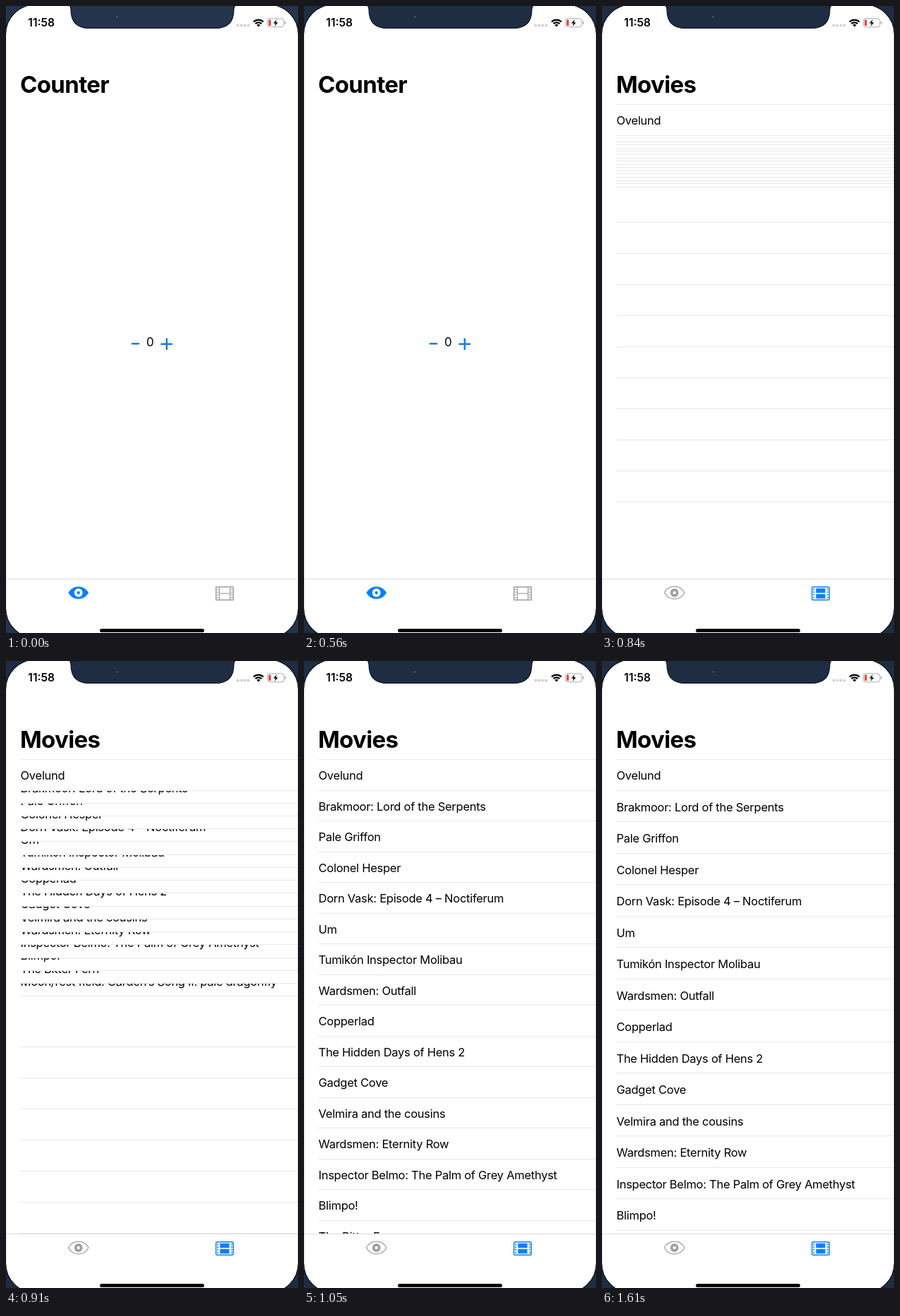
Write an HTML page with a canvas that moves like this. It is 414 by 888 pixels and loops after 2.03 s.

```html
<!DOCTYPE html>
<html lang="en">
<head>
<meta charset="utf-8">
<title>Counter and movies</title>
<style>
  html, body { margin: 0; width: 100%; height: 100%; overflow: hidden; background: #fff; }
  canvas { display: block; width: 414px; height: 888px; }
</style>
</head>
<body>
<canvas id="stage" width="414" height="888"></canvas>
<script>
const ctx = document.getElementById('stage').getContext('2d');
const W = 414, H = 888, LOOP = 2030, STEP = 70;
const SWITCH = 770, GROW = 313;
const BLUE = '#0a80f5', GREY = '#a0a0a0', LINE = '#e8e8e8', RIM = '#10161f';
const LIST_TOP = 139, ROWS_TOP = 183, ROW = 44.5, TAB_TOP = 811;

const titles = [
  'Brakmoor: Lord of the Serpents',
  'Pale Griffon',
  'Colonel Hesper',
  'Dorn Vask: Episode 4 – Noctiferum',
  'Um',
  'Tumikón Inspector Molibau',
  'Wardsmen: Outfall',
  'Copperlad',
  'The Hidden Days of Hens 2',
  'Gadget Cove',
  'Velmira and the cousins',
  'Wardsmen: Eternity Row',
  'Inspector Belmo: The Palm of Grey Amethyst',
  'Blimpo!',
  'The Bitter Fern',
  'Moon/rest field: Garden’s Song II. pale dragonfly'
];

function rect(x, y, w, h, color) {
  ctx.fillStyle = color;
  ctx.fillRect(x, y, w, h);
}

function pill(x, y, w, h, r, color, stroked) {
  ctx.beginPath();
  ctx.roundRect(x, y, w, h, r);
  paint(color, stroked);
}

function disc(x, y, r, color) {
  ctx.beginPath();
  ctx.arc(x, y, r, 0, Math.PI * 2);
  paint(color);
}

function paint(color, stroked) {
  if (stroked) {
    ctx.strokeStyle = color;
    ctx.stroke();
  } else {
    ctx.fillStyle = color;
    ctx.fill();
  }
}

function text(str, x, y, size, weight = 400, spacing = 0) {
  ctx.font = `${weight} ${size}px Inter, Roboto, sans-serif`;
  ctx.letterSpacing = spacing + 'px';
  ctx.fillStyle = '#000';
  ctx.fillText(str, x, y);
}

const heading = str => text(str, 20, 123, 33, 700, -0.65);
const label = (str, y) => text(str, 20.5, y, 16.5, 400, -0.27);
const separator = (y, color = LINE) => rect(20, Math.floor(y), W - 20, 1, color);

// cubic-bezier(.42, 0, .58, 1)
function easeInOut(x) {
  if (x <= 0) return 0;
  if (x >= 1) return 1;
  let lo = 0, hi = 1;
  for (let i = 0; i < 24; i++) {
    const s = (lo + hi) / 2, q = 1 - s;
    const bx = 3 * q * q * s * 0.42 + 3 * q * s * s * 0.58 + s ** 3;
    if (bx < x) lo = s; else hi = s;
  }
  return lo * lo * (3 - 2 * lo);
}

function drawCounter() {
  const color = '#1a7cd8';
  heading('Counter');
  rect(178, 477, 11, 2.5, color);
  text('0', 199, 482, 17);
  rect(219.5, 477.5, 16.5, 2.5, color);
  rect(226.6, 470.5, 2.5, 16.5, color);
}

function drawMovies(p) {
  heading('Movies');
  separator(LIST_TOP);
  label('Ovelund', 168);
  separator(ROWS_TOP, p ? LINE : '#d4d4d4');

  if (p < 1) {
    for (let i = 0; i < 10; i++) separator(226 + i * 44 + p * 783);
  }
  if (!p) return;

  // Each label hangs from the bottom edge of its growing row.
  const h = ROW * p;
  titles.forEach((title, i) => {
    const top = ROWS_TOP + i * h, bottom = top + h;
    ctx.save();
    ctx.beginPath();
    ctx.rect(0, Math.floor(top) + 1, W, h);
    ctx.clip();
    label(title, bottom - 15);
    ctx.restore();
    separator(bottom);
  });
}

function drawEye(active) {
  const x = 102.7, y = 831;
  ctx.beginPath();
  ctx.moveTo(x - 14.3, y);
  ctx.bezierCurveTo(x - 8, y - 11.8, x + 8, y - 11.8, x + 14.3, y);
  ctx.bezierCurveTo(x + 8, y + 11.8, x - 8, y + 11.8, x - 14.3, y);
  ctx.closePath();
  ctx.lineWidth = 1.3;
  paint(active ? BLUE : GREY, !active);
  disc(x, y, 5.9, active ? '#fff' : GREY);
  disc(x, y, 2.2, active ? BLUE : '#fff');
}

function drawFilm(active) {
  const color = active ? BLUE : GREY;
  ctx.lineWidth = 1.4;
  pill(297.7, 822.7, 24.6, 18.6, active ? 2 : 0.5, color, true);
  if (active) {
    for (const y of [824.8, 832.8]) rect(303.4, y, 13.2, 6.4, color);
  } else {
    for (const x of [302, 317]) rect(x, 823, 1.1, 18, color);
    rect(303, 831.4, 14, 1.2, color);
  }
  for (const x of [298, 318]) {
    for (let i = 0; i < 4; i++) {
      if (active) rect(x + 1.4, 825.2 + i * 3.9, 1.8, 1.8, color);
      else rect(x, 825.7 + i * 3.9, 4, 1, color);
    }
  }
}

function drawTabs(movies) {
  rect(0, TAB_TOP, W, H - TAB_TOP, '#fff');
  rect(0, TAB_TOP, W, 1, '#dcdcdc');
  drawEye(!movies);
  drawFilm(movies);
  pill(133, 882, 148, 5, 2.5, '#000');
}

function drawStatus() {
  text('11:58', 31.3, 29.3, 15.6, 600);
  for (let i = 0; i < 4; i++) disc(328.5 + i * 5, 27.6, 2, '#d2d2d6');

  // Wi-Fi
  const cx = 358, cy = 29.5, a = Math.PI / 4;
  ctx.lineWidth = 2.2;
  for (const r of [6.2, 9.8]) {
    ctx.beginPath();
    ctx.arc(cx, cy, r, -Math.PI / 2 - a, -Math.PI / 2 + a);
    paint('#000', true);
  }
  ctx.beginPath();
  ctx.moveTo(cx, cy);
  ctx.arc(cx, cy, 3.6, -Math.PI / 2 - a, -Math.PI / 2 + a);
  paint('#000');

  // Battery
  ctx.lineWidth = 1;
  pill(370.5, 17.8, 23.5, 12, 3.4, '#ababab', true);
  pill(395.2, 21.8, 1.5, 4, 0.8, '#ababab');
  pill(372.3, 19.6, 3.2, 8.4, 1, '#e8402f');
  ctx.beginPath();
  ctx.moveTo(383.8, 19);
  ctx.lineTo(379, 24.6);
  ctx.lineTo(382, 24.6);
  ctx.lineTo(380.8, 28.8);
  ctx.lineTo(385.6, 23.2);
  ctx.lineTo(382.6, 23.2);
  ctx.closePath();
  paint('#000');
}

function drawBezel(color) {
  ctx.lineWidth = 1.2;
  ctx.beginPath();
  ctx.rect(0, 0, W, H);
  ctx.roundRect(0, -1.5, W, 896, 41.5);
  ctx.fillStyle = color;
  ctx.fill('evenodd');
  pill(-0.5, -2, W + 1, 897, 42, RIM, true);

  ctx.beginPath();
  ctx.moveTo(89, -1);
  ctx.quadraticCurveTo(92, 0, 92, 5);
  ctx.bezierCurveTo(92, 22, 100, 31.5, 118, 31.5);
  ctx.lineTo(297, 31.5);
  ctx.bezierCurveTo(315, 31.5, 323, 22, 323, 5);
  ctx.quadraticCurveTo(323, 0, 326, -1);
  paint(color);
  paint(RIM, true);
  disc(157.5, 15.5, 0.8, '#8b98aa');
}

function draw(t) {
  const movies = t >= SWITCH;
  rect(0, 0, W, H, '#fff');
  if (movies) drawMovies(easeInOut((t - SWITCH) / GROW));
  else drawCounter();
  drawTabs(movies);
  drawStatus();
  drawBezel(t < 560 ? '#24344d' : '#1f2d43');
}

function tick() {
  const t = performance.now() % LOOP;
  draw(Math.floor(t / STEP) * STEP);
  requestAnimationFrame(tick);
}
tick();
</script>
</body>
</html>
```
